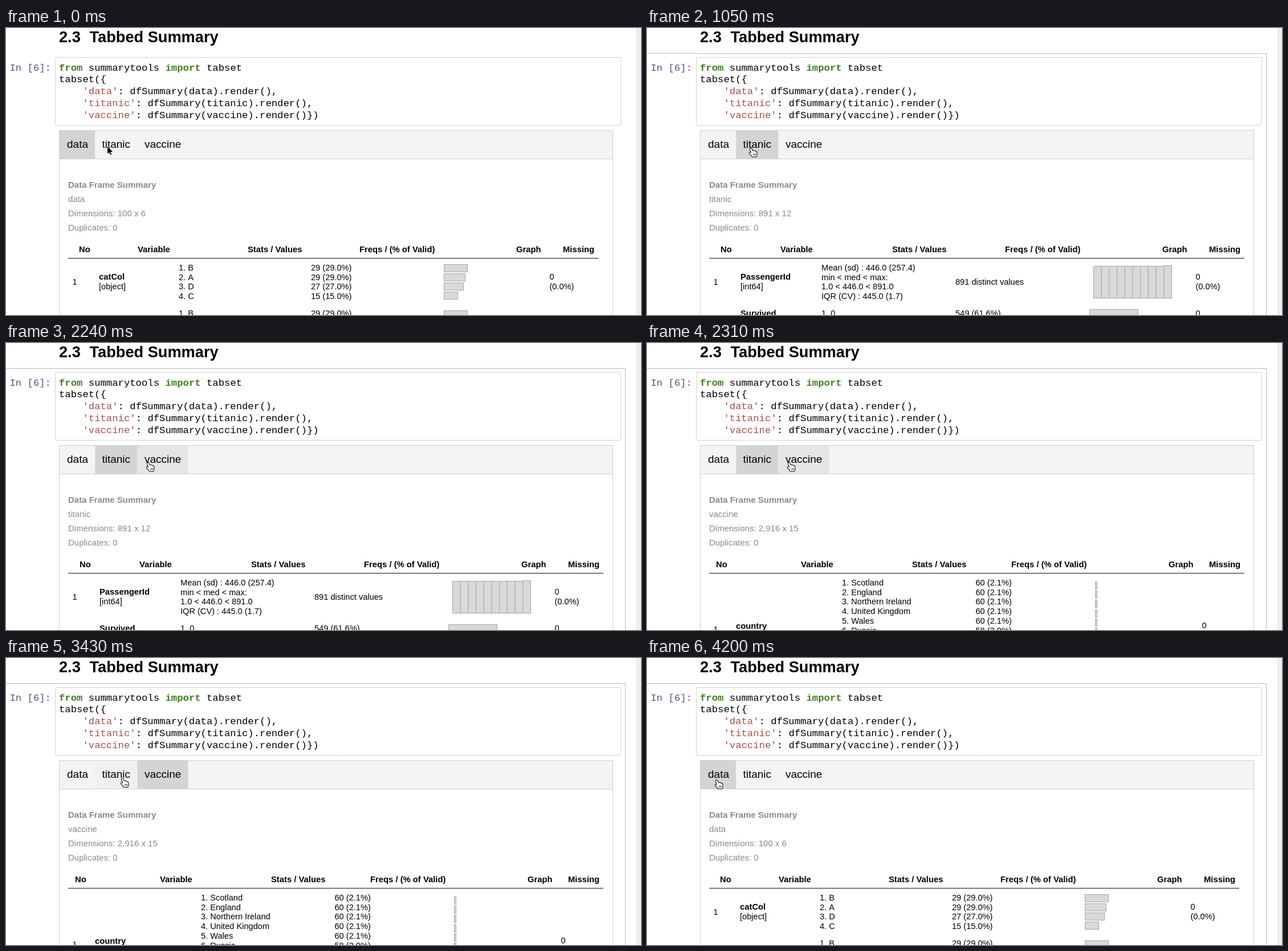
An HTML page with a canvas that plays this animation: 1114x503 px, repeating every 4830 ms.

```html
<!DOCTYPE html>
<html lang="en">
<head>
<meta charset="utf-8">
<title>Tabbed Summary</title>
<style>
html, body { margin: 0; width: 100%; height: 100%; overflow: hidden; background: #fff; }
canvas { display: block; }
</style>
</head>
<body>
<canvas id="stage" width="1114" height="503"></canvas>
<script>
const ctx = document.getElementById('stage').getContext('2d');
const LOOP = 4830, STEP = 70, FADE = 300;
const SANS = '"Liberation Sans", Arial, sans-serif';
const MONO = '"Liberation Mono", "Courier New", monospace';
const CELL = '14.6px ' + SANS;
const BOLD = 'bold 14.8px ' + SANS;
const CHAR = 10.36;
const IDLE = 244, HOVER = 229, ACTIVE = 212;

// Tab shade changes: [time, new target]; each one fades in.
const tabs = [
  { name: 'data', x: 94, w: 62.3, textX: 107,
    keys: [[-FADE, ACTIVE], [150, IDLE], [3620, HOVER], [3985, ACTIVE, 220]] },
  { name: 'titanic', x: 156.3, w: 74.2, textX: 168.4,
    keys: [[-FADE, IDLE], [150, ACTIVE], [2290, IDLE], [3330, HOVER], [3620, IDLE]] },
  { name: 'vaccine', x: 230.5, w: 89, textX: 243,
    keys: [[-FADE, IDLE], [1330, HOVER], [2290, ACTIVE], [3985, IDLE, 220]] }
];

const views = {
  data: { size: '100 x 6', heads: [128, 231, 424, 620, 895, 977], end: 1039, body: dataRows },
  titanic: { size: '891 x 12', heads: [129, 234, 430, 628, 904, 986], end: 1048, body: titanicRows },
  vaccine: { size: '2,916 x 15', heads: [121, 270, 465, 639, 915, 986], end: 1048, body: vaccineRows }
};
const headNames = ['No', 'Variable', 'Stats / Values', 'Freqs / (% of Valid)', 'Graph', 'Missing'];

const clamp = u => Math.max(0, Math.min(1, u));
const smooth = u => u * u * (3 - 2 * u);
const ramp = (t, from, to) => smooth(clamp((t - from) / (to - from)));
const mix = (a, b, u) => a + (b - a) * u;

function text(str, x, y, font = CELL, color = '#000') {
  ctx.font = font;
  ctx.fillStyle = color;
  ctx.fillText(str, x, y);
}

function lines(list, x, y, gap = 16.7) {
  list.forEach((str, i) => text(str, x, y + i * gap));
}

function rect(x, y, w, h, color) {
  ctx.fillStyle = color;
  ctx.fillRect(x, y, w, h);
}

function bar(x, y, w, h) {
  rect(x, y, w, h, '#d9d9d9');
  ctx.strokeStyle = '#a6a6a6';
  ctx.lineWidth = 1;
  ctx.strokeRect(x + 0.5, y + 0.5, w - 1, h - 1);
}

function variable(name, type, x) {
  text('1', 116.5, 450);
  text(name, x, 441, BOLD);
  text(type, x, 458);
}

function dataRows() {
  variable('catCol', '[object]', 163);
  lines(['1. B', '2. A', '3. D', '4. C'], 303, 425);
  lines(['29 (29.0%)', '29 (29.0%)', '27 (27.0%)', '15 (15.0%)'], 535, 425);
  [42, 38, 35, 25].forEach((w, i) => bar(768, 414 + i * 16, w, 14));
  lines(['0', '(0.0%)'], 953.5, 441);
  text('1. B', 303, 505);
  text('29 (29.0%)', 535, 505);
  bar(768, 495, 42, 14);
}

function titanicRows() {
  variable('PassengerId', '[int64]', 164);
  lines(['Mean (sd) : 446.0 (257.4)', 'min < med < max:', '1.0 < 446.0 < 891.0',
         'IQR (CV) : 445.0 (1.7)'], 306, 425);
  text('891 distinct values', 541, 450);
  for (let i = 0; i < 10; i++) {
    const top = i < 9 ? 417 : 416;
    bar(783 + i * 13.7, top, 14.7, 474 - top);
  }
  lines(['0', '(0.0%)'], 962.5, 441);
  text('Survived', 164, 505, BOLD);
  text('1. 0', 306, 505);
  text('549 (61.6%)', 541, 505);
  bar(776, 493, 86, 16);
  text('0', 962.5, 505);
}

function vaccineRows() {
  text('1', 116.5, 507);
  text('country', 156, 501, BOLD);
  lines(['1. Scotland', '2. England', '3. Northern Ireland', '4. United Kingdom',
         '5. Wales', '6. Russia'], 342, 425);
  for (let i = 0; i < 6; i++) {
    text(i < 5 ? '60 (2.1%)' : '58 (2.0%)', 576.5, 425 + i * 16.7);
    bar(786, Math.round(418 + i * 16.2), 4, 14);
  }
  text('0', 973.5, 500);
}

function codeLine(row, parts) {
  let col = 0;
  for (const [str, kind] of parts) {
    const color = { key: '#3f7f24', str: '#a6504a' }[kind] || '#000';
    const weight = kind === 'key' ? 'bold ' : '';
    text(str, 93 + col * CHAR, 74.5 + row * 20.8, weight + '17.25px ' + MONO, color);
    col += str.length;
  }
}

function drawCode() {
  const heading = 'bold 27.2px ' + SANS;
  text('2.3', 93, 25, heading);
  text('Tabbed Summary', 146.5, 25, heading);
  text('In [6]:', 6.5, 74.5, '17.25px ' + MONO, '#51548c');
  ctx.strokeStyle = '#d2d2d2';
  ctx.lineWidth = 1;
  ctx.beginPath();
  ctx.roundRect(86.5, 51.5, 992, 119, 2);
  ctx.stroke();
  codeLine(0, [['from', 'key'], [' summarytools '], ['import', 'key'], [' tabset']]);
  codeLine(1, [['tabset({']]);
  tabs.forEach(({ name }, i) => codeLine(2 + i, [
    ['    '], [`'${name}'`, 'str'],
    [`: dfSummary(${name}).render()` + (i < 2 ? ',' : '})')]
  ]));
}

function shade(keys, t) {
  let value = keys[0][1];
  keys.forEach(([start, target, span = FADE], i) => {
    if (t < start) return;
    const next = keys[i + 1];
    const until = next ? Math.min(t, next[0]) : t;
    value = mix(value, target, ramp(until, start, start + span));
  });
  return Math.round(value);
}

function drawTabs(t) {
  const edge = '#d0d0d0';
  rect(93, 179, 972, 51, '#f4f4f4');
  for (const tab of tabs) {
    const v = shade(tab.keys, t);
    rect(tab.x, 179, tab.w, 50, `rgb(${v},${v},${v})`);
    text(tab.name, tab.textX, 210, '19px ' + SANS);
  }
  rect(93, 179, 972, 1, edge);
  rect(93, 229, 972, 1, edge);
  rect(93, 179, 1, 324, edge);
  rect(1064, 179, 1, 324, edge);
}

function drawView(name) {
  const view = views[name], gray = '#8a8a8a', font = '15px ' + SANS;
  text('Data Frame Summary', 109, 280, 'bold ' + font, gray);
  text(name, 109, 305, font, gray);
  text('Dimensions: ' + view.size, 109, 330, font, gray);
  text('Duplicates: 0', 109, 354.5, font, gray);
  headNames.forEach((str, i) => text(str, view.heads[i], 393, BOLD));
  rect(109, 403, view.end - 109, 1, '#111');
  view.body();
}

function drawShape(x, y, d, fill, line, width) {
  ctx.save();
  ctx.translate(x, y);
  const path = new Path2D(d);
  ctx.lineJoin = 'round';
  ctx.lineWidth = width;
  ctx.strokeStyle = line;
  ctx.stroke(path);
  ctx.fillStyle = fill;
  ctx.fill(path);
  ctx.restore();
}

const ARROW = 'M0 0 V13 L3 10.3 L5 15 L7.2 14 L5.2 9.5 H9.2 Z';
const HAND = 'M-5.2 -6 Q-4.6 -7.8 -3 -7 L-.8 -2.5 Q.6 -3.6 1.8 -2.2 Q3.2 -3.1 4.1 -1.5 ' +
  'Q6 -2 6.3 0 L6.6 3 Q6.4 5 5.4 7.5 H-1.2 Q-2 5.8 -4 4 L-6 1.6 Q-6.4 -.4 -4.2 .2 L-2.6 1.4 Z';
const KNUCKLES = 'M.7 2.2 V5.4 M2.6 2.2 V5.4 M4.4 2.2 V5.4';

function drawCursor(t) {
  if (t < 70) {
    drawShape(178, 207.5, ARROW, '#000', '#fff', 2);
    return;
  }
  const there = ramp(t, 960, 1540), back = ramp(t, 3150, 3850);
  const x = Math.round(mix(mix(181, 253, there), 126, back));
  const y = mix(mix(218, 217, there), 221.5, back);
  drawShape(x, y, HAND, '#fff', '#000', 2);
  drawShape(x, y, KNUCKLES, 'transparent', '#222', 0.9);
}

function currentView(t) {
  if (t < 210 || t >= 4060) return 'data';
  return t < 2310 ? 'titanic' : 'vaccine';
}

function draw(t) {
  rect(0, 0, 1114, 503, '#fff');
  rect(1107, 0, 7, 503, '#eee');
  rect(1106, 0, 1, 503, '#e2e2e2');
  if (t >= 70) {
    rect(0, 44, 1087, 1, '#b8b8b8');
    rect(1086, 44, 1, 459, '#b8b8b8');
  }
  drawCode();
  drawTabs(t);
  drawView(currentView(t));
  drawCursor(t);
}

let origin;
function tick(now) {
  origin ??= now;
  draw(Math.floor((now - origin) % LOOP / STEP) * STEP);
  requestAnimationFrame(tick);
}
draw(0);
requestAnimationFrame(tick);
</script>
</body>
</html>
```
